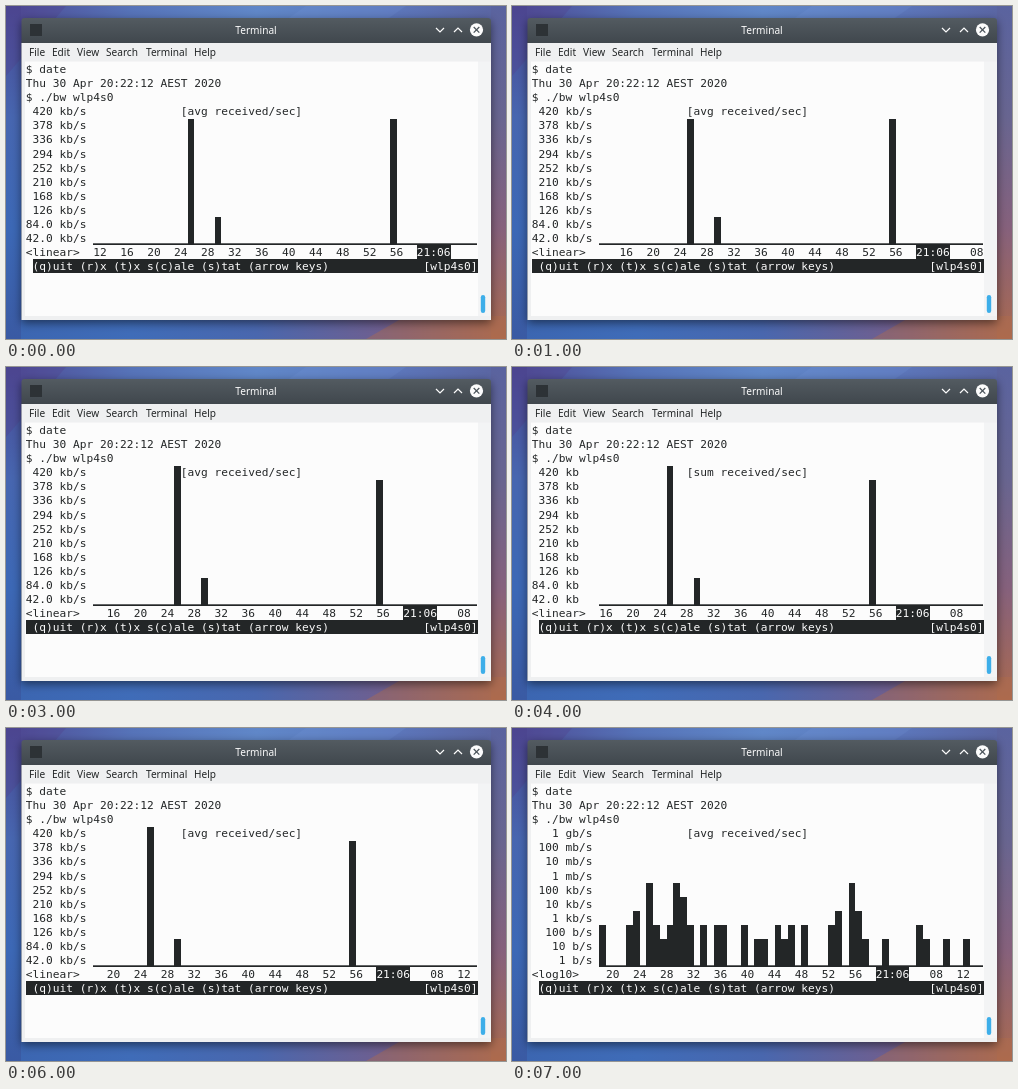
These frames come from a looping animation (500x333 px, 8 s). An HTML page with a canvas:

```html
<!DOCTYPE html>
<html lang="en">
<head>
<meta charset="utf-8">
<title>Bandwidth monitor</title>
<style>
html, body { margin: 0; width: 100%; height: 100%; overflow: hidden; }
canvas { display: block; width: 500px; height: 333px; }
</style>
</head>
<body>
<canvas id="stage" width="500" height="333"></canvas>
<script>
const ctx = document.getElementById('stage').getContext('2d');
const DARK = '#232627', PAPER = '#fcfcfc', PANEL = '#eff0f1';
const MONO = '11.2px "DejaVu Sans Mono", monospace';
const SANS = '10.1px "Noto Sans", sans-serif';
const CELL_W = 6.742, CELL_H = 14.07, LEFT = 19.8, TOP = 56.4;
const COLS = 67, CHART_COL = 10, AXIS_ROW = 13;

// One state per second: columns scrolled, first column of the key bar, mode.
const STATES = [
  [0, 1, 'avg'], [1, 0, 'avg'], [1, 1, 'avg'], [2, 0, 'avg'],
  [4, 1, 'sum'], [5, 0, 'sum'], [6, 0, 'avg'], [7, 1, 'log']
];
const LINEAR_LABELS = ['420', '378', '336', '294', '252', '210', '168', '126', '84.0', '42.0'];
const LOG_LABELS = ['1 gb', '100 mb', '10 mb', '1 mb', '100 kb', '10 kb', '1 kb', '100 b', '10 b', '1 b'];
const LOG_BARS = '3000340' + '6323653' + '0303300' + '3022032' +
                 '3030003' + '4064200' + '2000032' + '00200200';
const LINEAR_BARS = [[26, 10], [30, 2], [56, 9]];

const colX = col => LEFT + col * CELL_W;
const rowY = row => TOP + row * CELL_H;

function rect(x, y, w, h, color) {
  ctx.fillStyle = color;
  ctx.fillRect(x, y, w, h);
}

function cells(col, row, w, h, color) {
  const x = Math.round(colX(col)), y = Math.round(rowY(row));
  rect(x, y, Math.round(colX(col + w)) - x, Math.round(rowY(row + h)) - y, color);
}

function label(text, x, y, color, font = SANS, align = 'left') {
  ctx.font = font;
  ctx.textAlign = align;
  ctx.fillStyle = color;
  ctx.fillText(text, x, y);
}

function print(text, col, row, color = DARK) {
  label(text, colX(col), rowY(row) + 10.7, color, MONO);
}

function poly(points, color) {
  ctx.beginPath();
  points.forEach(([x, y]) => ctx.lineTo(x, y));
  ctx.fillStyle = color;
  ctx.fill();
}

function stroke(points, color, width = 1.2) {
  ctx.beginPath();
  points.forEach(([x, y], i) => i ? ctx.lineTo(x, y) : ctx.moveTo(x, y));
  ctx.strokeStyle = color;
  ctx.lineWidth = width;
  ctx.stroke();
}

function gradient(x0, y0, x1, y1, colors) {
  const g = ctx.createLinearGradient(x0, y0, x1, y1);
  colors.forEach((c, i) => g.addColorStop(i / (colors.length - 1), c));
  return g;
}

function drawDesktop() {
  rect(0, 0, 500, 170, gradient(0, 0, 500, 40, ['#4c4a94', '#5673b8', '#6087c8', '#5c78bd', '#5a639f']));
  rect(0, 170, 500, 163, gradient(0, 0, 500, 0, ['#3b65b0', '#3f6cb8', '#4967ae', '#6e5f90', '#a9694f']));
  rect(0, 0, 15, 333, gradient(0, 0, 0, 333, ['#494892', '#4766b0', '#3c68b6', '#3a5aa3']));
  rect(485, 0, 15, 333, gradient(0, 0, 0, 333, ['#5a639f', '#686590', '#86617c', '#a9694f']));
  poly([[0, 0], [60, 0], [0, 70]], '#51408a55');
  poly([[300, 0], [400, 0], [380, 14], [280, 14]], '#7298d433');
  poly([[360, 333], [400, 310], [500, 310], [500, 333]], '#b26b4a66');
}

function drawWindow() {
  ctx.save();
  ctx.shadowColor = 'rgba(0,0,0,.5)';
  ctx.shadowBlur = 10;
  ctx.shadowOffsetY = 3;
  ctx.beginPath();
  ctx.roundRect(15.5, 12, 469.5, 302, [3, 3, 0, 0]);
  ctx.fillStyle = gradient(0, 12, 0, 37, ['#535b61', '#40474d']);
  ctx.fill();
  ctx.restore();
  rect(15.5, 37, 469.5, 277, PANEL);
  rect(19, 55.5, 453, 254.5, PAPER);
  rect(472, 55.5, 13, 254.5, '#f3f4f5');

  rect(24, 18, 12, 12, '#2d3236');
  label('Terminal', 250, 27.8, PAPER, SANS, 'center');
  stroke([[430, 22], [434, 26], [438, 22]], PAPER);
  stroke([[448, 26], [452, 22], [456, 26]], PAPER);
  ctx.beginPath();
  ctx.arc(470.5, 23.8, 6.6, 0, 7);
  ctx.fillStyle = PAPER;
  ctx.fill();
  stroke([[467.7, 21], [473.3, 26.6]], '#475057');
  stroke([[473.3, 21], [467.7, 26.6]], '#475057');

  const menu = { File: 23, Edit: 46, View: 71, Search: 100, Terminal: 140, Help: 188 };
  for (const name in menu) label(name, menu[name], 49.6, DARK);

  ctx.beginPath();
  ctx.roundRect(474.8, 289, 4.4, 18, 2.2);
  ctx.fillStyle = '#3daee9';
  ctx.fill();
}

function drawBar(col, height) {
  cells(col, AXIS_ROW - height, 1, height, DARK);
}

function drawChart(offset, mode) {
  const log = mode === 'log';
  if (log) [...LOG_BARS].forEach((h, i) => drawBar(CHART_COL + i, +h));
  else LINEAR_BARS.forEach(([second, h]) => drawBar(second - 2 - offset, h));

  const labels = log ? LOG_LABELS : LINEAR_LABELS.map(n => n + ' kb');
  labels.forEach((text, i) =>
    print(text.padStart(7 - (text.endsWith(' b') ? 1 : 0)).replace(/ b$/, ' b') +
      (mode === 'sum' ? '' : '/s'), text.endsWith(' b') ? 1 : 0, 3 + i));

  cells(23, 3, 18, 1, PAPER);
  print(`[${mode === 'sum' ? 'sum' : 'avg'} received/sec]`, 23, 3);
  rect(87, 237.3, 384, 1.7, DARK);
}

function drawAxis(offset, mode) {
  print(mode === 'log' ? '<log10>' : '<linear>', 0, AXIS_ROW);
  for (let second = 12; second <= 72; second += 4) {
    const col = second - 2 - offset;
    if (second === 60) {
      cells(col, AXIS_ROW, 5, 1, DARK);
      print('21:06', col, AXIS_ROW, PAPER);
    } else if (second !== 64 && col >= CHART_COL && col + 2 <= COLS) {
      print(String(second % 60).padStart(2, '0'), col, AXIS_ROW);
    }
  }
}

function drawKeys(start) {
  cells(start, 14, COLS - start, 1, DARK);
  print('(q)uit (r)x (t)x s(c)ale (s)tat (arrow keys)', 1, 14, PAPER);
  print('[wlp4s0]', 59, 14, PAPER);
}

function draw(time) {
  const [offset, keyStart, mode] = STATES[Math.floor(time / 1000) % STATES.length];
  drawDesktop();
  drawWindow();
  ['$ date', 'Thu 30 Apr 20:22:12 AEST 2020', '$ ./bw wlp4s0']
    .forEach((line, row) => print(line, 0, row));
  drawChart(offset, mode);
  drawAxis(offset, mode);
  drawKeys(keyStart);
}

const start = performance.now();
function tick() {
  draw(performance.now() - start);
  requestAnimationFrame(tick);
}
tick();
</script>
</body>
</html>
```
